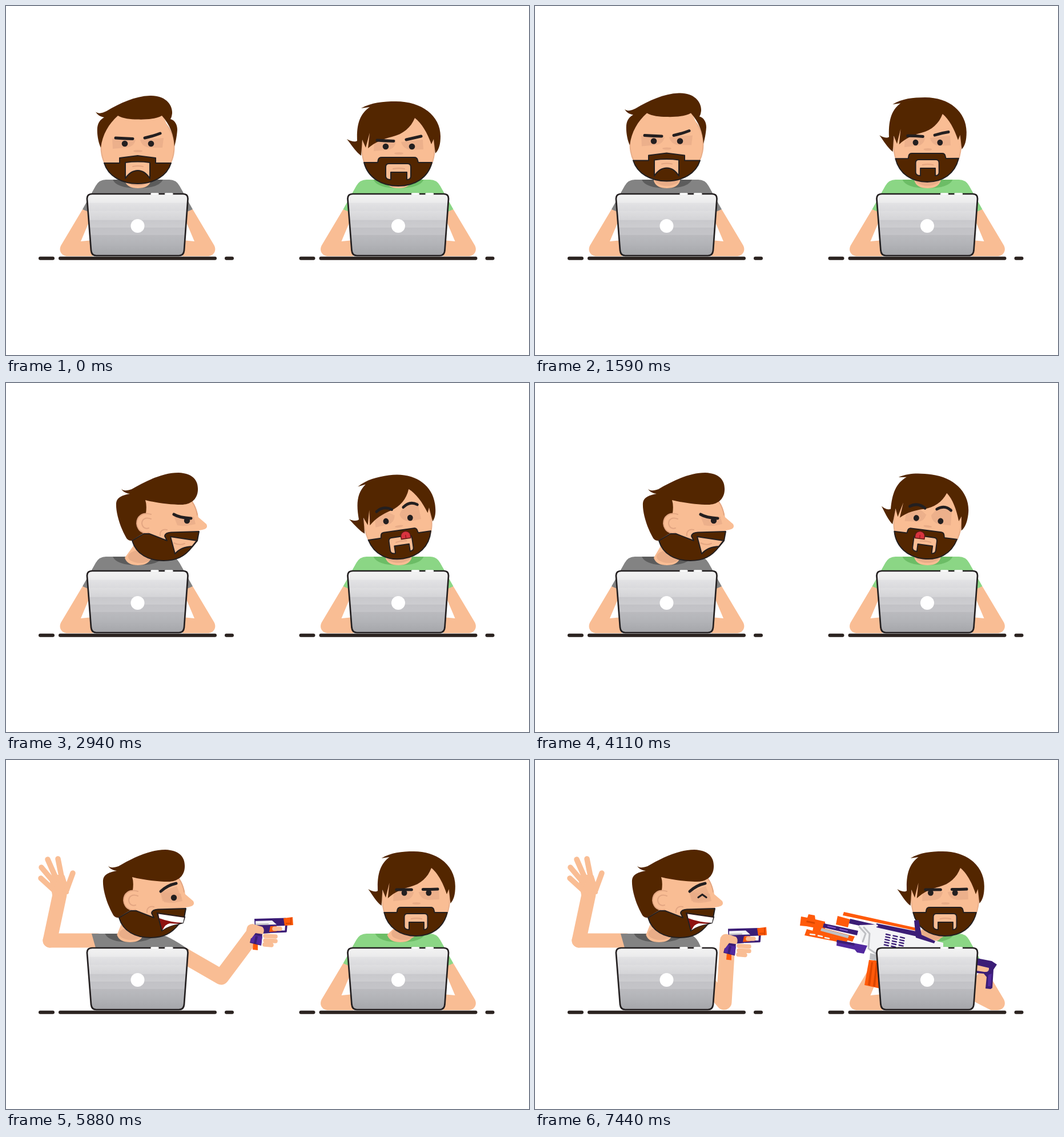
Recreate the animation shown at these times as an HTML page. Size 916 px wide and 611 px high, loop 8 s.

```html
<!DOCTYPE html>
<html lang="en">
<head>
<meta charset="utf-8">
<title>Desk duel</title>
<style>
html, body { margin: 0; width: 100%; height: 100%; overflow: hidden; background: #fff; }
svg { display: block; width: 100%; height: 100%; }
.ln { fill: none; stroke-linecap: round; stroke-linejoin: round; }
.sk { fill: #f9bd94; }
.lm { stroke: #f9bd94; }
.sh { fill: #e9ad88; }
.cr { stroke: #e3a682; stroke-width: 2; }
.br { fill: #532600; }
.bd { fill: #532600; stroke: #231f20; stroke-width: 2; stroke-linejoin: round; }
.mo { fill: #f9bd94; stroke: #231f20; stroke-width: 2; stroke-linejoin: round; }
.ink { fill: #231f20; }
.bw { stroke: #231f20; stroke-width: 5; }
.pu { fill: #3b1d76; }
.pl { fill: #52299f; }
.or { fill: #ff5a0a; }
.od { fill: #dc4600; }
.wh { fill: #f3f3f5; }
.gy { fill: #bfc0c4; }
</style>
</head>
<body>
<svg id="stage" viewBox="0 0 916 611" xmlns="http://www.w3.org/2000/svg"></svg>
<script>
const LOOP = 8000, GAP = 456.5;
const stage = document.getElementById('stage');

const path = (cls, d, extra = '') => `<path class="${cls}" d="${d}" ${extra}/>`;
const line = (cls, d, w, extra = '') => path('ln ' + cls, d, (w ? `stroke-width="${w}" ` : '') + extra);
const tint = (color, d, w) => line('', d, w, `stroke="${color}"`);
const brows = id => line('bw', '', 0, `id="${id}1"`) + line('bw', '', 0, `id="${id}2"`);
const dot = (cls, x, y, rx, ry = rx, extra = '') =>
  `<ellipse class="${cls}" cx="${x}" cy="${y}" rx="${rx}" ry="${ry}" ${extra}/>`;
const group = (id, body) => `<g id="${id}">${body}</g>`;
const right = body => `<g transform="translate(${GAP} 0)">${body}</g>`;

const arm = path('sk', 'M134 356L97 418C91 428 97 438 108 438H152V410L131 412L153 360Z');
const mirrorArm = `<g transform="matrix(-1 0 0 1 461 0)">${arm}</g>`;
const gripArm = path('sk', 'M327 356L364 418C370 428 364 438 353 438H342L307 420V388L322 372L312 357Z');
const shirtPath = 'M175 304H286Q298 304 304 315L327 356L315 361V400H146V361L134 356L157 315Q163 304 175 304Z';

const laptop =
  path('', 'M151 329H310Q319 329 318.5 338L312 428Q311 437 303 437H158Q150 437 149 428L142 338Q141.5 329 151 329Z',
    'fill="url(#metal)" stroke="#231f20" stroke-width="2.7"') +
  tint('#fff', 'M255 329H266M279.5 329H291', 3.4) +
  dot('', 230.5, 385, 12, 12, 'fill="#fff"') +
  tint('#2b2320', 'M60 441.8H82M95 441.8H366M386 441.8H396', 6);

const neck = (id, collar) =>
  path('', 'M187 304H275Q268 319 231 319Q194 319 187 304Z', `id="${id}Collar" fill="${collar}"`) +
  path('sk', '', `id="${id}Neck"`) + dot('sh', 231, 304, 21, 11, `id="${id}Shade"`);

const frontHead =
  dot('sk', 230.5, 247, 64, 64, 'stroke="#e9ae89" stroke-width="2"') +
  path('sk', 'M196 186H273L293 236H168Z') +
  path('sh', 'M186 232L227 234Q224 247 210 248L187 250ZM235 234L276 231L274 248L252 248Q238 247 235 234Z', 'opacity=".75"') +
  path('sh', 'M235 234Q244 219 262 213L275 217L276 231Z', 'id="lLift"') +
  path('bd', 'M172 275H199V266Q215 264 230.5 262Q246 264 262 266V275H289C282 298 258 311 230.5 311C203 311 179 298 172 275Z') +
  path('mo', 'M209 274Q231 271 252 274V302Q243 288 231 288Q218 288 209 302Z') +
  line('cr', 'M222 281Q231 279 240 281') +
  dot('sh', 231, 254, 8, 2) +
  group('lEyes', dot('ink', 208, 241, 5.3) + dot('ink', 254, 241, 5.3)) +
  brows('lBrow') + path('br', '', 'id="lHair"');

const sideHead =
  path('sk', 'M236 204L322 206Q331 220 333 235L347 247Q351 255 340 257L334 258L332 276L322 287Q300 311 272 311Q225 308 216 270Z') +
  line('cr', 'M322 208Q329 218 331 231') +
  path('br', 'M198 185C201 190 210 188 216 186C240 172 270 157 298 157C325 158 333 172 332 188C331 205 318 213 303 213C285 213 260 210 240 205Q243 214 241 228L238 262L216 276Q209 277 205 268C195 250 188 225 189 210C190 200 201 196 213 194C206 193 200 190 198 185Z') +
  path('sk', 'M246 229C232 226 225 235 225 246C226 258 236 266 248 262Z') +
  line('cr', 'M250 230C235 225 225 234 225 246C226 258 236 265 246 262M250 238C240 234 234 239 234 246C235 253 240 256 246 254M266 267C265 259 271 255 278 257') +
  path('bd', 'M217 276L237 264H247L278 276L274 268Q275 262 285 261.5L334 260L331 276L322 287C309 304 294 311 272 311C246 311 224 300 217 276Z') +
  group('grin', path('mo', 'M284 269L330 276L322 286Q302 287 292 299Z') + line('cr', 'M290 280Q300 285 309 281')) +
  group('laugh',
    path('', 'M284 268L332 275L329 285L322 287Q304 289 292 299Z', 'fill="#8e1210" stroke="#231f20" stroke-width="2"') +
    path('', 'M286 269.5L331 276L329 285Q306 284 287.5 277Z', 'fill="#fff"') +
    path('', 'M293 298Q298 287 306 286L322 287Q303 290 293 298Z', 'fill="#fff"')) +
  path('sh', 'M289 231L325 234L328 247Q308 252 296 249Z', 'opacity=".75"') +
  path('sh', 'M289 231L318 221L327 242Q308 250 293 247Z', 'opacity=".7" id="tease"') +
  dot('ink', 313, 241, 5.2, 5.2, 'id="sideEye"') +
  group('wink', tint('#231f20', 'M305 240.5L312 235.5L319 240.5', 3.2)) +
  line('bw', '', 0, 'id="sideBrow"');

const waveHand =
  line('lm', 'M77 316L94 236', 25) +
  path('sk lm', 'M84 236L80 214L87 204H100L103 214L107 232Z', 'stroke-width="6" stroke-linejoin="round"') +
  line('lm', 'M84 228L61 207M84 214L62 188M88 208L73 174M98 208L91 173M106 228L117 198', 9.5);

const pistol =
  path('or', 'M433 320L441 322L436 343L436 348L427 346L429 341Z', 'id="pump"') +
  path('or', 'M433 320L441 322L441 333L432 332Z') +
  path('pu', 'M435 278L490 276.5V290L465 291L463 303L449 304L447 325L427 320L432 300L436 296Z') +
  path('pl', 'M431 306L449 309L447 324L428 319Z') +
  path('pu', 'M437 308L441 309L438 322L434 321Z') +
  path('wh', 'M437 282L466 281L474 288L437 289Z') +
  path('gy', 'M437 286.5L460 286V288.5L437 289Z') +
  tint('#3b1d76', 'M464 301L490 300L491 288', 3.6) +
  path('or', 'M463 291H474V300L461 301Z') +
  path('or', 'M486 277L502 275L503 289L488 290Z') + path('od', 'M498 276H500V289H498ZM490 285H498V287H490Z') +
  group('loaded', path('pu', 'M502 280H507V288H502Z') + path('or', 'M506 281L511 280V288L506 288Z')) +
  path('sk', 'M421 298Q422 287 432 287L449 292Q454 297 450 305L437 303L430 312L421 312Z') +
  line('lm', 'M470 295.5H480M454 308L472 309M454 316L472 317M453 323L465 324', 7.5);

const dart = path('pu', 'M-9 -4H0V4H-9Z') + path('or', 'M-1 -4H5V4H-1Z');

const rightHead =
  dot('sk', 687, 251, 63.5, 64, 'stroke="#e9ae89" stroke-width="2"') +
  path('sh', 'M645 237L683 238Q680 251 668 252L644 254ZM692 238L730 234L731 251L709 252Q695 250 692 238Z', 'opacity=".75"') +
  path('sh', 'M645 237L660 224L683 238ZM692 238L702 224L730 220V234Z', 'id="rLift"') +
  path('bd', 'M627 274H651L652 269Q653 265 658 265H715Q720 265 721 270L722 274H746C739 301 716 315 687 315C658 315 634 301 627 274Z') +
  path('mo', 'M671 276H703Q709 276 709 282V298Q709 304 702 304V291H674V304Q665 304 665 298V282Q665 276 671 276Z') +
  line('cr', 'M678 285Q688 283 698 285') +
  group('tongue', path('', 'M-9 5V0A9 8 0 0 1 9 0V5Z', 'fill="#d8343f" stroke="#5a1a14" stroke-width="1.5"') +
    tint('#8e1a20', 'M0 -1V4', 1.5)) +
  dot('sh', 688, 258, 8, 2) +
  group('rEyes', dot('ink', 665, 246, 5.3) + dot('ink', 711, 246, 5.3)) +
  path('br', 'M622 179C640 169 660 167 683 167C728 167 761 192 761 228C761 243 758 252 752 258L749 233L745 242C738 222 728 205 716 196C709 213 696 224 676 229C660 233 647 238 634 249L637 222L630 248L624 234L622 262C612 255 605 243 597 233C606 238 612 238 615 236C614 210 618 190 637 177Z') +
  brows('rBrow');

let vents = '';
for (let r = 0; r < 5; r++)
  for (let c = 0; c < 3; c++)
    vents += `M${615 + c * 12.5 - r * .8} ${305 + r * 4.6 + c * 2.6}l7 1.6`;

const blaster =
  path('or', 'M585 350L606 352L604 400L577 394Z') + path('od', 'M589 354L592 354L587 395L583 394ZM597 355L600 355L596 397L592 396Z') +
  path('gy', 'M587 338L606 343V353L586 349Z') +
  path('or', 'M466 274L477 276L479 270L490 272L491 279L508 283V297L475 291L464 290Z') +
  path('od', 'M476 281L490 284V287L475 284Z') +
  path('or', 'M488 290L560 309L556 318L486 300Z') +
  path('or', 'M476 296L522 309L548 315L544 321L472 307Z') +
  tint('#f3f3f5', 'M482 305L490 306M496 307.5L503 309M508 311L515 312.5', 2.5) +
  path('gy', 'M502 294L550 307L548 312L500 299Z') +
  path('pu', 'M506 286L566 299L564 307L504 293Z') +
  tint('#7d55c8', 'M513 291L526 294M534 296L547 299', 2) +
  path('pl', 'M529 315L582 325L576 339L564 337L560 332L528 325Z') +
  path('pu', 'M529 315L560 321L559 325L528 319Z') +
  path('or', 'M530 273L552 279L548 293L527 288Z') +
  path('pu', 'M552 278L604 290L600 297L550 286Z') +
  path('wh', 'M568 289L598 288L715 320V334L640 350L600 345L588 330L570 315Z') +
  tint('#bfc0c4', 'M568 292L579 304L574 318M576 293L586 304L584 330L600 341M600 331L690 345', 3) +
  path('or', 'M541 266L668 294V299L539 272Z') +
  path('pu', 'M598 286L668 300L669 309L598 293Z') + dot('wh', 599, 290, 1.7) +
  path('pu', 'M664 281L672 280L677 306L701 317L699 321L667 311Z') +
  tint('#3b1d76', vents, 2.4) +
  line('lm', 'M778 366L790 368', 12) +
  path('pu', 'M774 347L800 352L809 358L803 367L801 399L798 401L789 400L791 380L786 374L774 373V369L787 371Q796 372 795 364L774 359Z') +
  path('pl', 'M794 376L800 374L798 396L793 396Z');

const metal = [['#f3f3f3', 0], ['#ebebec', 14], ['#e2e2e4', 15], ['#dadadd', 27], ['#dedee0', 28], ['#d4d4d7', 42],
  ['#c8c8cc', 43], ['#cdcdd0', 54], ['#c2c2c6', 55], ['#c4c4c8', 66], ['#bababe', 67], ['#b4b5b9', 79], ['#a5a6aa', 100]]
  .map(([c, o]) => `<stop offset="${o}%" stop-color="${c}"/>`).join('');

stage.innerHTML =
  `<defs><linearGradient id="metal" x1="0" y1="0" x2="0" y2="1">${metal}</linearGradient>
   <clipPath id="above"><path d="M0 0H916V330H0Z"/></clipPath></defs>` +
  group('rest', arm + mirrorArm + path('', shirtPath, 'fill="#838383"')) +
  group('armed',
    group('wave', line('lm', 'M77 316H160', 25) + group('forearm', waveHand)) +
    line('lm', '', 27, 'id="gunArm"') +
    path('', '', 'id="shirt" fill="#838383"')) +
  `<g clip-path="url(#above)">` + group('lNeckBox', neck('l', '#5c5c5c')) + group('front', frontHead) + group('side', sideHead) + '</g>' +
  group('pistol', pistol) +
  right(arm + group('idleArm', mirrorArm) + group('gripArm', gripArm) +
    path('', shirtPath, 'fill="#8bd685"') + neck('r', '#6cbd66')) +
  group('rHead', rightHead) + group('blaster', blaster) + group('dart', dart) +
  laptop + right(laptop);

const el = {};
stage.querySelectorAll('[id]').forEach(n => el[n.id] = n);
const show = (n, on) => n.setAttribute('display', on ? 'inline' : 'none');
const move = (n, s) => n.setAttribute('transform', s);
const shape = (n, d) => n.setAttribute('d', d);
const fade = (n, v) => n.setAttribute('opacity', v);
const mix = (a, b, k) => a + (b - a) * k;
const mixAll = (a, b, k) => a.map((v, i) => mix(v, b[i], k));

// Eased value from alternating time, value pairs
function key(t, ...k) {
  if (t <= k[0]) return k[1];
  for (let i = 2; i < k.length; i += 2)
    if (t < k[i]) {
      const u = (t - k[i - 2]) / (k[i] - k[i - 2]);
      return mix(k[i - 1], k[i + 1], u * u * (3 - 2 * u));
    }
  return k[k.length - 1];
}

function brow(n, a, b, k) {
  const p = mixAll(a, b, k);
  shape(n, `M${p[0]} ${p[1]}Q${p[2]} ${p[3]} ${p[4]} ${p[5]}`);
}

function drawNeck(id, base, top) {
  shape(el[id + 'Neck'], `M${base - 23} 306L${top - 21} 277H${top + 21}L${base + 23} 306Q${base + 19} 319 ${base} 319Q${base - 19} 319 ${base - 23} 306Z`);
  move(el[id + 'Shade'], `translate(${base - 231 + (top - base) * .2} 0)`);
  move(el[id + 'Collar'], `translate(${base - 231} 0)`);
}

// The fringe lifts by `up` when the head tips back
function drawFrontHair(up) {
  const y = 198.5 - up;
  shape(el.lHair, `M157 185C162 190 170 187 176 184C200 170 225 158 252 157C278 156 292 172 291 188C290 195 289 196 288 198C296 200 300 208 300 217C299 230 297 238 295 246C294 225 287 208 273 ${192 - up * .6}C262 ${y} 240 ${y + .5} 230 ${y}C218 ${y} 205 ${y - 1.5} 196 ${192 - up * .3}C180 206 169 225 166 248C162 240 159 225 160 213C161 204 165 199 172 195C166 194 160 191 157 185Z`);
}

const FIRE = 5190, HIT = 5280, DRAWN = 4290, TURN = 2400, REVENGE = 7320;

function leftMan(t) {
  const turned = t >= TURN, armed = t >= DRAWN;
  show(el.front, !turned);
  show(el.side, turned);
  show(el.rest, !armed);
  show(el.armed, armed);
  show(el.pistol, armed);

  const duck = key(t, 1260, 0, 1530, -6, 1620, -4, 1890, 70, 2130, 70, 2400, 88);
  const sly = key(t, 1590, 0, 1860, 1);
  move(el.front, `translate(0 ${duck})`);
  move(el.lEyes, `translate(${9 * sly} 0)`);
  fade(el.lLift, .75 * sly);
  drawFrontHair(6.5 * sly);
  brow(el.lBrow1, [192, 231, 207, 232, 222, 232.5], [192, 235, 212, 237, 223, 232], sly);
  brow(el.lBrow2, [243, 231, 257, 228, 270, 223], [244, 220, 260, 205, 270, 213], sly);

  const lean = key(t, 3390, 4, 3720, 0, FIRE + 60, 0, 5490, -19);
  const rise = key(t, 2430, 88, 2760, -4, 2940, 0);
  move(el.side, `translate(${lean} ${rise})`);
  const joy = key(t, FIRE + 60, 0, 5430, 1);
  const laughing = t >= 5310, squint = t >= 6030;
  show(el.grin, !laughing);
  show(el.laugh, laughing);
  show(el.tease, laughing);
  show(el.sideEye, !squint);
  show(el.wink, squint);
  brow(el.sideBrow, [290, 230, 300, 236, 320, 237], [290, 230, 302, 219, 317, 216], joy);
  show(el.lNeckBox, (turned ? rise : duck) < 50);
  drawNeck('l', 231 + Math.min(0, lean) * .72, turned ? 246 + lean : 231);

  const swing = key(t, DRAWN, 95, 4530, -4, 4710, 0);
  const wag = t > 5880 && t < 6750 ? 2.5 * (1 - Math.cos((t - 5880) / 870 * Math.PI * 6)) : 0;
  move(el.forearm, `rotate(${swing + wag} 77 316)`);
  move(el.wave, `translate(${key(t, DRAWN, 60, 4500, 0)} 0)`);

  const out = key(t, DRAWN, 0, 4560, 1.04, 4740, 1);
  const low = key(t, 6360, 0, 6750, 1);
  const kick = key(t, FIRE, 0, FIRE + 60, 1, FIRE + 300, 0);
  const gx = mix(mix(330, 435, out), 338, low) - 9 * kick;
  const gy = mix(mix(335, 300, out), 317.5, low) - 6 * kick;
  const ex = mix(mix(318, 377, out), 331, low), ey = mix(mix(410, 380, out), 424, low);
  shape(el.gunArm, `M${mix(292, 285, low)} ${mix(331, 370, low)}L${ex} ${ey}L${gx - 1} ${gy + 4}`);
  const [cx, cy, sx, sy] = mixAll([283, 306, 320, 332], [284, 306, 291, 330], low);
  shape(el.shirt, `M150 304H265Q${cx} ${cy} ${sx} ${sy}L280 400H170L157 329Z`);
  move(el.pistol, `translate(${gx - 435} ${gy - 300})`);
  show(el.loaded, t < FIRE);
  show(el.pump, t < FIRE + 30);
}

function rightMan(t) {
  const dx = key(t, HIT, 0, 5400, 35, 5580, 31);
  const dy = key(t, 840, 0, 1140, -4, 1200, -4, 1560, -7);
  const sx = key(t, 1200, 1, 1560, .93);
  const tilt = key(t, 1560, 0, 1920, -8.3, 3390, -8.3, 3840, 7.3, 4260, 7.3, 4650, 0);
  const jolt = key(t, HIT, 0, 5370, 7, 5580, 0);
  move(el.rHead, `translate(${687.5 + dx} ${255 + dy}) rotate(${tilt + jolt}) scale(${sx} 1) translate(-687.5 -255)`);

  const bored = key(t, 4290, 0, 4620, 1);
  const raised = key(t, 1530, 0, 1830, 1);
  const glance = key(t, 6120, 0, 6300, 1);
  move(el.rEyes, `translate(${-5 * glance} ${-6.5 * bored})`);
  fade(el.rLift, .75 * raised * (1 - bored));
  const up1 = mixAll([650, 235, 664, 236, 679, 236.5], [650, 227, 664, 218, 679, 227], raised);
  const up2 = mixAll([701, 234, 714, 231, 727, 228], [701, 226, 715, 216, 728, 225], raised);
  brow(el.rBrow1, up1, [650, 234, 664, 234, 679, 234], bored);
  brow(el.rBrow2, up2, [700, 233.5, 714, 233.5, 728, 233], bored);

  const lick = key(t, 1590, 0, 1830, 1, 4260, 1, 4440, 0);
  const side = key(t, 3390, 12, 3840, -11);
  const wiggle = t > 2430 && t < 2970 ? 2 * Math.sin((t - 2430) / 540 * Math.PI * 4) : 0;
  show(el.tongue, lick > .02);
  move(el.tongue, `translate(${687 + side + wiggle} ${mix(285, 276, lick)}) scale(${lick})`);
  drawNeck('r', 231 + dx * .1, 231 + dx);

  const angry = t >= REVENGE;
  show(el.blaster, angry);
  show(el.gripArm, angry);
  show(el.idleArm, !angry);
  move(el.blaster, `translate(${key(t, REVENGE, 10, 7380, -35, 7440, 0)} ${key(t, REVENGE, 46, 7380, -11, 7440, 0)})`);
}

function flyDart(t) {
  show(el.dart, t >= FIRE && t < 5580);
  if (t < HIT) {
    const u = (t - FIRE) / (HIT - FIRE);
    move(el.dart, `translate(${mix(507, 624, u)} ${mix(284, 212, u)}) rotate(-32)`);
  } else {
    const u = (t - HIT) / 300;
    move(el.dart, `translate(${624 - 50 * u} ${212 - 260 * u + 36 * u * u}) rotate(${-32 - 520 * u})`);
  }
}

function render(t) {
  leftMan(t);
  rightMan(t);
  flyDart(t);
}

const start = performance.now();
function tick() {
  render((performance.now() - start) % LOOP);
  requestAnimationFrame(tick);
}
render(0);
requestAnimationFrame(tick);
</script>
</body>
</html>
```
